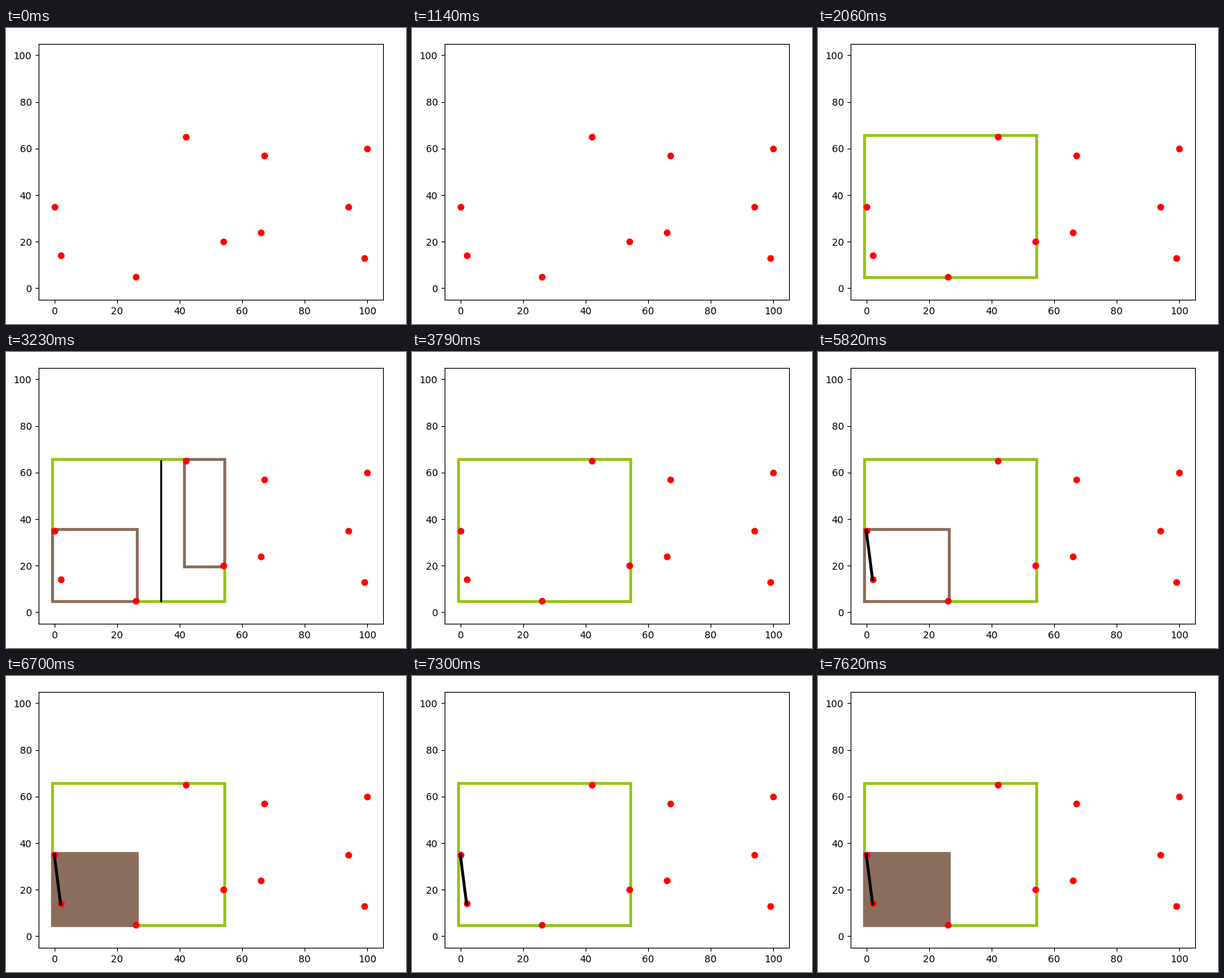
A matplotlib script for the animation above (8 s loop, 576 by 427 pixels).

```python
import matplotlib.pyplot as plt
from matplotlib.animation import FuncAnimation
from matplotlib.patches import Rectangle

W, H, DPI = 576, 427, 100
INTERVAL, LOOP = 20, 8000
GREEN, BROWN = "#94c517", "#8b6d5c"
PAD = 0.5

POINTS = sorted([(0, 35), (2, 14), (26, 5), (42, 65), (54, 20),
                 (66, 24), (67, 57), (94, 35), (99, 13), (100, 60)])

# The small excess keeps the pixel size from being truncated.
fig = plt.figure(figsize=((W + 1e-6) / DPI, (H + 1e-6) / DPI), dpi=DPI, facecolor="white")
ax = fig.add_axes([47 / W, 34.8 / H, 496 / W, 369.6 / H])
ax.set(xlim=(-5, 105), ylim=(-5, 105))
ax.plot(*zip(*POINTS), "ro")


def bounding_box(points, color, filled=False):
    xs, ys = zip(*points)
    x, y = min(xs) - PAD, min(ys) - PAD
    return ax.add_patch(Rectangle(
        (x, y), max(xs) - x + PAD, max(ys) - y + PAD,
        edgecolor=color, facecolor=color if filled else "none", linewidth=3))


def divider(left, right):
    x = (left[-1][0] + right[0][0]) / 2
    ys = [y for _, y in left + right]
    return ax.plot([x, x], [min(ys), max(ys)], color="black", linewidth=2)[0]


left, right = POINTS[:5], POINTS[5:]
inner_left, inner_right = left[:3], left[3:]

left_box = bounding_box(left, GREEN)
right_box = bounding_box(right, GREEN)
outer_cut = divider(left, right)

inner_left_box = bounding_box(inner_left, BROWN)
inner_right_box = bounding_box(inner_right, BROWN)
inner_cut = divider(inner_left, inner_right)

solved_box = bounding_box(inner_left, BROWN, filled=True)
pair_line = ax.plot(*zip(*inner_left[:2]), color="black", linewidth=3)[0]

# Spans in ms during which each part is visible.
OUTER_SPLIT = [(590, 1140), (1510, 2060)]
INNER_SPLIT = [(3230, 3790), (4110, 4710)]
SCHEDULE = {
    left_box: [(590, 1140), (1510, LOOP)],
    right_box: OUTER_SPLIT,
    outer_cut: OUTER_SPLIT,
    inner_left_box: [(3230, 3790), (4110, 6380)],
    inner_right_box: INNER_SPLIT,
    inner_cut: INNER_SPLIT,
    pair_line: [(5820, LOOP)],
    solved_box: [(6700, 7300), (7620, LOOP)],
}


def update(frame):
    t = (frame + 0.5) * INTERVAL
    for artist, spans in SCHEDULE.items():
        artist.set_visible(any(start <= t < end for start, end in spans))
    return list(SCHEDULE)


anim = FuncAnimation(fig, update, frames=LOOP // INTERVAL, interval=INTERVAL,
                     repeat=True, repeat_delay=0)
plt.show()
```
